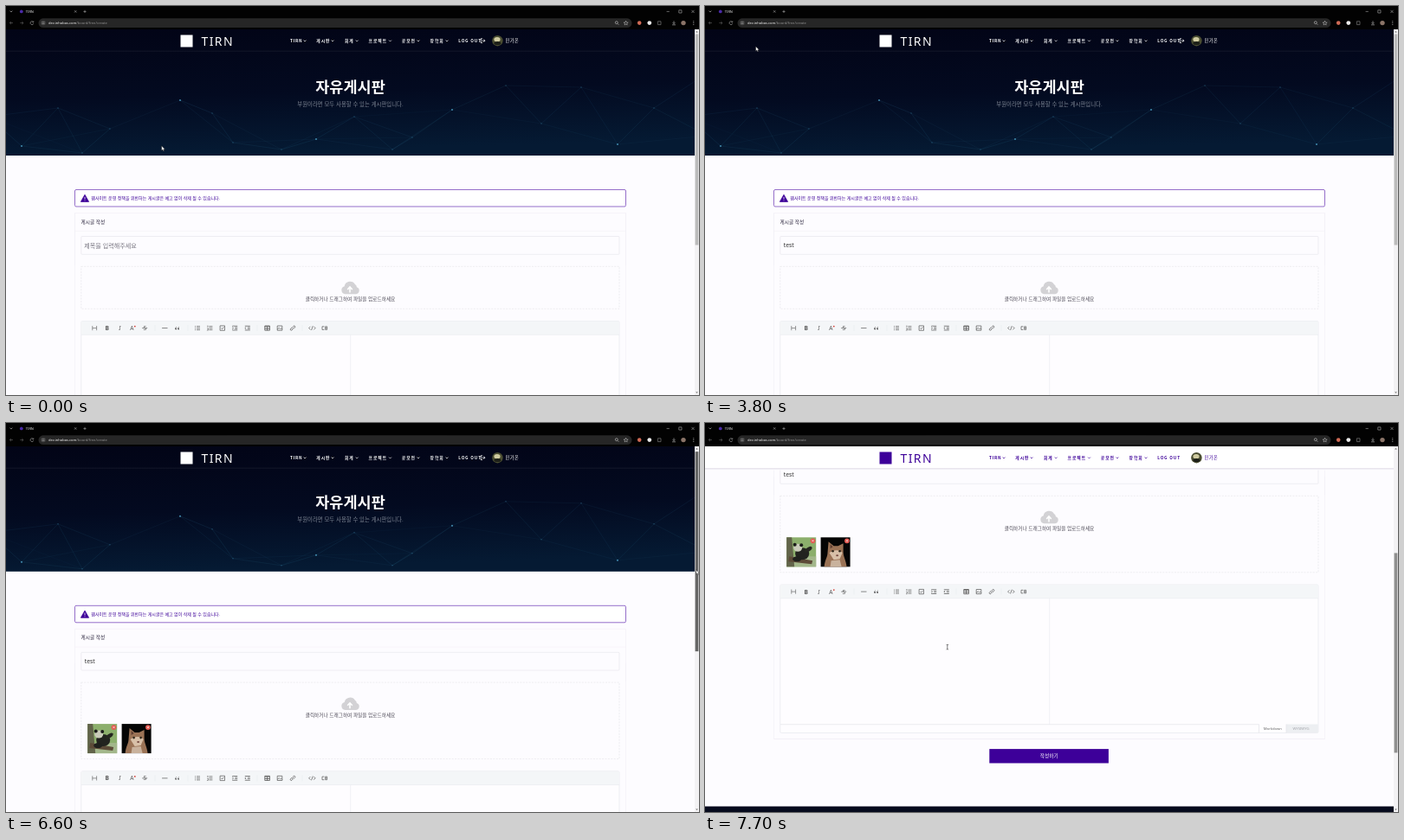
An HTML page that plays this animation: 800x450 px, repeating every 8 s.

```html
<!DOCTYPE html>
<html lang="ko">
<head>
<meta charset="utf-8">
<title>Board editor</title>
<style>
  html, body { margin: 0; width: 100%; height: 100%; overflow: hidden; background: #fdfcff; }
  svg { display: block; width: 800px; height: 450px; }
  text { font-family: "Noto Sans CJK KR", "Noto Sans CJK", "Noto Sans", sans-serif; white-space: pre; }
  .latin { font-family: "Noto Sans", "Open Sans", sans-serif; }
</style>
</head>
<body>
<svg id="stage" viewBox="0 0 800 450"></svg>
<script>
const LOOP = 8000, STEP = 100;
const SITE = 'TIRN', USER = '민가온';
const INK = '#3d0099', SHIFT = 39.5;

// Markup helpers
const rect = (x, y, w, h, fill, more = '') =>
  `<rect x="${x}" y="${y}" width="${w}" height="${h}" fill="${fill}" ${more}/>`;
const frame = (x, y, w, h, color, more = '') =>
  rect(x, y, w, h, 'none', `stroke="${color}" stroke-width=".6" ${more}`);
const ell = (x, y, rx, ry, fill, more = '') =>
  `<ellipse cx="${x}" cy="${y}" rx="${rx}" ry="${ry}" fill="${fill}" ${more}/>`;
const dot = (x, y, r, fill, more) => ell(x, y, r, r, fill, more);
const line = (d, color, w = .6, more = '') =>
  `<path d="${d}" fill="none" stroke="${color}" stroke-width="${w}" ${more}/>`;
const shape = (d, fill, more = '') => `<path d="${d}" fill="${fill}" ${more}/>`;
const text = (x, y, size, fill, str, more = '') =>
  `<text x="${x}" y="${y}" font-size="${size}" fill="${fill}" ${more}>${str}</text>`;
const group = (id, body, more = '') => `<g id="${id}" ${more}>${body}</g>`;
const MID = 'text-anchor="middle"', LATIN = 'class="latin"';

function hero() {
  const nodes = [[-20, 128], [18, 162], [88, 170], [60, 118], [120, 142], [201, 109], [238, 124],
    [262, 158], [318, 166], [358, 154], [402, 128], [446, 166], [469, 152], [515, 120], [577, 92],
    [618, 136], [664, 94], [706, 160], [748, 118], [800, 84], [810, 150]];
  let net = '';
  nodes.forEach(([x, y], i) => {
    nodes.slice(i + 1).forEach(([u, v]) => {
      const d = Math.hypot(u - x, v - y);
      if (d < 118) net += line(`M${x} ${y}L${u} ${v}`, '#2f7396', .45, `opacity="${(.46 - d / 330).toFixed(2)}"`);
    });
    net += dot(x, y, i % 4 === 1 ? 1.1 : .7, '#4b9cc0', `opacity="${i % 4 === 1 ? .8 : .4}"`);
  });
  return rect(0, 27, 795, 146, 'url(#night)') +
    `<g clip-path="url(#heroBox)">${net}</g>` +
    text(397.5, 99.5, 17.5, '#fff', '자유게시판', MID + ' font-weight="700"') +
    text(397.5, 115.6, 6.4, '#7d8492', '부원이라면 모두 사용할 수 있는 게시판입니다.', MID);
}

function formTop() {
  return rect(79.5, 212.5, 636, 19.5, '#fff', 'rx="1.5" stroke="#7a4bbd" stroke-width=".8"') +
    shape('M91 218.3L95.6 226.4H86.4Z', INK, `stroke="${INK}" stroke-width=".8" stroke-linejoin="round"`) +
    line('M91 220.8V223.6M91 224.6V225.4', '#fff', .8) +
    text(98.3, 224.2, 5, INK, '웹사이트 운영 정책을 위반하는 게시글은 예고 없이 삭제 될 수 있습니다.') +
    text(86.6, 251.6, 5.65, '#27223a', '게시글 작성', 'font-weight="500"') +
    line('M79.5 260.3H715.5', '#f1eff5') +
    frame(86.8, 266.5, 621.2, 20.8, '#e4e2e9', 'rx="1"') +
    text(90.3, 279.6, 7.05, '#77747f', '제목을 입력해주세요', 'id="hint"') +
    text(90.8, 279.4, 6.8, '#333', '', 'id="title" class="latin"') +
    rect(0, 273.2, .6, 7.6, '#222', 'id="caret"') +
    frame(86.8, 301.3, 621.2, 49, '#e3e1e6', 'id="drop" stroke-dasharray="2 1.4"') +
    shape('M391.5 333.2a4.6 4.6 0 0 1-.8-9a6.6 6.6 0 0 1 12.2-2.2a4 4 0 0 1 2 3.2a4.1 4.1 0 0 1-1.3 8Z', '#d3d2d5') +
    line('M397 331.4V325.4M394.2 328L397 325L399.8 328', '#fff', 1.6) +
    text(397.5, 341.3, 5.67, '#4c4955', '클릭하거나 드래그하여 파일을 업로드하세요', MID);
}

// Each thumbnail is drawn in a 34 x 34 box
const photos = [
  { name: 'panda.jpg', art: rect(0, 0, 34, 34, '#8caf6c') + rect(0, 22, 34, 12, '#a3b78b') +
    shape('M0 0H6L9 34H0Z', '#62644a') + shape('M3 22L30 27L29 31L2 28Z', '#5d4b38') +
    ell(18, 19, 8, 7, '#22231f') + ell(13, 12, 5, 4.5, '#c9cbb9') + dot(9.5, 8.5, 2, '#1b1c1a') +
    dot(17, 9, 2, '#1b1c1a') + ell(25, 14, 5, 2.3, '#252620', 'transform="rotate(-35 25 14)"') +
    ell(12, 25, 5, 3, '#20211e') },
  { name: 'cat.png', art: rect(0, 0, 34, 34, '#050505') +
    shape('M4 34C5 25 8 23 8 17L9 5L15 10H20L26 7L26 17C26 22 29 26 30 34Z', '#9b7356') +
    shape('M10 18C14 14 23 14 25 18L22 25L15 26Z', '#d8c0a8') + shape('M11 8L14 11L11 13Z', '#5e3d31') +
    shape('M12 27L22 26L24 34H11Z', '#c9b29d') + dot(14, 16, 1.3, '#2d261a') + dot(22, 16, 1.3, '#2d261a') +
    ell(19, 21, 1.5, 1, '#784c42') },
  { name: 'bear.jpg', art: rect(0, 0, 34, 34, '#26341f') + rect(22, 0, 12, 34, '#3f5130') +
    ell(16, 28, 12, 9, '#141613') + ell(16, 14, 9, 8.5, '#e3ddd0') + dot(8, 6, 3, '#111') +
    dot(24, 6, 3, '#111') + ell(12.5, 13, 2, 2.7, '#151515') + ell(20, 13, 2, 2.7, '#151515') +
    ell(16.3, 18, 1.7, 1.1, '#222') + ell(17, 27, 4, 3, '#d6d0c2') }
];
const thumbX = i => 94.2 + i * 39.4;

const thumbs = () => photos.map(({ name, art }, i) => group('photo' + i,
  art +
  `<g id="over${i}">${rect(0, 0, 34, 34, '#fff', 'opacity=".62"')}
   ${rect(8, 14.5, 18, 6, '#fff', 'opacity=".4" rx="1"')}
   ${text(17, 19, 4.4, '#333', name, MID + ' ' + LATIN)}</g>` +
  dot(30.3, 4, 2.9, '#e2574f') + line('M29.1 2.8L31.5 5.2M31.5 2.8L29.1 5.2', '#fff', .6),
  `transform="translate(${thumbX(i)} 349.3)"`)).join('');

function toolbar() {
  const c = '#555', y = 372.6;
  const icon = (x, d, w = .7) => line(d, c, w, `transform="translate(${x} ${y})"`);
  const glyph = (x, s, more = '') => text(x, y + 2.4, 6.6, c, s, `${MID} ${LATIN} ${more}`);
  const rows = 'M-1-2H3M-1 0H3M-1 2H3';
  const indent = 'M-3-2.4H3M0-.8H3M0 .8H3M-3 2.4H3';
  return line('M99.8 370V375.2M104.6 370V375.2M99.8 372.6H104.6', c) +
    glyph(116.8, 'B', 'font-weight="800"') + glyph(131.2, 'I', 'font-style="italic"') +
    glyph(145.4, 'A') + dot(148.8, 370.6, .9, '#d4453c') +
    glyph(160.2, 'S') + icon(160.2, 'M-3 0H3') +
    line('M172 369V376M210 369V376M290 369V376M342 369V376', '#e6e9ec', .5) +
    icon(183.3, 'M-3.2 0H3.2') +
    icon(198, 'M-1.2-1.4Q-2.6-.8-2.4 1M1.8-1.4Q.4-.8.6 1', .6) +
    dot(196.1, y + .9, .9, c) + dot(199.1, y + .9, .9, c) +
    icon(221, rows + 'M-3-2H-2M-3 0H-2M-3 2H-2') +
    icon(235.4, rows + 'M-2.5-3V-1M-3.1 .4H-2V1.6L-3 2.6H-1.9') +
    icon(249.8, 'M-2.7-2.7H2.7V2.7H-2.7ZM-1.4 0L-.3 1.1L1.6-1.2') +
    icon(264.2, indent + 'M-3-1.2L-1.6 0L-3 1.2') + icon(278.8, indent + 'M-1.6-1.2L-3 0L-1.6 1.2') +
    icon(301.6, 'M-2.8-2.6H2.8V2.6H-2.8ZM-2.8-1.8H2.8M-2.8 .6H2.8M0-1.8V2.6', .8) +
    icon(316, 'M-2.8-2.6H2.8V2.6H-2.8ZM-2.8 1.4L-.8-.2L.6 1L1.6 .2L2.8 1.4') +
    icon(331, 'M-.4-1L1-2.4Q2-3 2.6-2.2T2.4-.6L1 .8M.4 1L-1 2.4Q-2 3-2.6 2.2T-2.4 .6L-1-.8M-1 1L1-1') +
    icon(353.4, 'M-2-1.8L-3.8 0L-2 1.8M2-1.8L3.8 0L2 1.8M.8-2.4L-.8 2.4') +
    icon(367.8, 'M-.4-1.8H-2.8V1.8H-.4M.8-1.8V1.8H2.8V-1.8ZM.8 0H2.8');
}

function formBottom() {
  return rect(86.8, 364.5, 621.2, 171.5, '#fff', 'fill-opacity=".35" stroke="#e2e4e9" stroke-width=".6" rx="1.5"') +
    rect(87.1, 364.8, 620.6, 15.4, '#f4f6f8') + line('M87 380.3H708', '#e6e8ec') +
    toolbar() +
    line('M397.7 380.3V526', '#e9eaee') + line('M87 526.2H639.5V535.8', '#dedfe5') +
    rect(671, 526, 36.8, 9.8, '#edeff2') + line('M671 526V536', '#dfe1e6') +
    text(655.3, 532.6, 4.2, '#666', 'Markdown', MID + ' ' + LATIN) +
    text(688, 532.6, 4.2, '#a3a5ab', 'WYSIWYG', MID + ' ' + LATIN) +
    line('M79.5 239.5V543M715.5 239.5V543', '#f1eff5') + line('M79.5 543H715.5', '#eceaf0') +
    rect(328.3, 554.6, 137.6, 16.4, INK) +
    text(397.3, 564.9, 5.7, '#fff', '작성하기', MID + ' font-weight="500"') +
    rect(0, 621, 795, 140, '#060a1d');
}

function header(color, solid) {
  const menu = [[328, SITE, 345], [358.3, '게시판', 377], [391, '회계', 405.2], [418.6, '프로젝트', 443.5],
    [456.8, '공모전', 476], [489.6, '장학회', 509], [522.3, 'LOG OUT']];
  const items = menu.map(([x, label, arrow]) =>
    text(x, 42, 4.8, color, label, `font-weight="700" letter-spacing="${/[A-Z]/.test(label) ? .75 : .95}"`) +
    (arrow ? line(`M${arrow - 1.4} 39.6L${arrow} 41L${arrow + 1.4} 39.6`, color, .7) : '')).join('');
  const back = solid
    ? rect(0, 52, 795, 2.5, 'url(#shade)') + rect(0, 27, 795, 25.2, '#fff')
    : line('M0 52.2H795', '#fff', .5, 'opacity=".13"') +
      line('M550 37.8H548.2V42.6H550M549.6 40.2H553M551.6 38.8L553 40.2L551.6 41.6', color, .8);
  return back + rect(201.5, 33.5, 14, 14, color) +
    text(225.5, 45.8, 14, color, SITE, LATIN + ' letter-spacing="1.4"') + items +
    dot(567.4, 40.2, 6.2, '#4a4d31') + ell(567, 38.8, 3.6, 2.8, '#cfcba0') + ell(567.4, 43, 4, 2, '#1c1f18') +
    text(576.4, 42.1, 5.2, color, USER, 'letter-spacing=".5"');
}

function browser() {
  const c = '#c8c8c8', dim = '#6a6a6a';
  return rect(0, 0, 800, 27, '#020202') + rect(37.5, 14.3, 685, 10.8, '#262626', 'rx="5.4"') +
    line('M4.6 5.6L6 7L7.4 5.6', c) + dot(17.8, 6.4, 1.9, '#4a2aa8') +
    text(22.8, 7.9, 4, '#ddd', SITE, LATIN) +
    line('M79 5.2L81.4 7.6M81.4 5.2L79 7.6M89.4 6.4H92.6M91 4.8V8', c, .5) +
    line('M762.6 6.4H765.8M776.8 4.8H780V8H776.8ZM791.4 4.8L794.6 8M794.6 4.8L791.4 8', c, .5) +
    line('M8 19.6H4.4M6 18L4.4 19.6L6 21.2', dim) + line('M16.4 19.6H20M18.4 18L20 19.6L18.4 21.2', dim) +
    line('M31.4 18.4A1.9 1.9 0 1 0 31.8 20.2M31.8 17.4V18.8H30.4', c, .5) +
    dot(43, 19.6, 3, '#3a3a3a') + line('M41.4 18.8H44.6M41.4 20.6H44.6', c, .5) +
    text(49, 21.2, 4.1, '#f2f2f2', 'dev.inhabas.com<tspan fill="#8f8f8f">/board/free/create</tspan>', LATIN) +
    dot(704.8, 19.2, 1.5, 'none', `stroke="${c}" stroke-width=".6"`) + line('M706 20.4L707.4 21.8', c) +
    line('M715.6 17.2L716.3 19L718.2 19.1L716.7 20.2L717.2 22L715.6 21L714 22L714.5 20.2L713 19.1L714.9 19Z', c, .5) +
    dot(731.2, 19.6, 2.3, '#cf6a55') + dot(742.8, 19.6, 2.4, '#ececec') +
    line('M752.4 17.8H756V21.6H752.4Z', dim, .8) +
    line('M771 17.4V20.4M769.6 19.2L771 20.6L772.4 19.2M769 21.8H773', c) + dot(782, 19.6, 2.7, '#8b7468') +
    dot(793.8, 17.8, .5, c) + dot(793.8, 19.6, .5, c) + dot(793.8, 21.4, .5, c);
}

const stage = document.getElementById('stage');
stage.innerHTML = `<defs>
  <linearGradient id="night" x1="0" y1="0" x2=".15" y2="1">
    <stop offset="0" stop-color="#020416"/><stop offset=".55" stop-color="#030a20"/><stop offset="1" stop-color="#051a33"/>
  </linearGradient>
  <linearGradient id="shade" x1="0" y1="0" x2="0" y2="1">
    <stop offset="0" stop-color="#ddd9e4"/><stop offset="1" stop-color="#fdfcff"/>
  </linearGradient>
  <clipPath id="heroBox">${rect(0, 27, 795, 146, '#000')}</clipPath></defs>` +
  rect(0, 0, 800, 450, '#fdfcff') +
  group('page', hero() + line('M79.5 239.5H715.5', '#f1eff5') + group('lower', formBottom()) +
    line('M79.5 239.5V300M715.5 239.5V300', '#f1eff5') + formTop() + group('thumbs', thumbs())) +
  group('clear', header('#fff', false)) + group('solid', header(INK, true)) +
  rect(795, 27, 5, 423, '#f3f2f4') + shape('M796.2 30.6L797.5 29L798.8 30.6Z', '#666') +
  shape('M796.2 446.4L797.5 448L798.8 446.4Z', '#666') + rect(795.6, 32, 3.8, 244, '#bbb', 'id="bar"') +
  browser() +
  group('arrow', shape('M0 0V5.4L1.3 4.3L2.1 6.1L3 5.7L2.2 4H3.9Z', '#fff', 'stroke="#111" stroke-width=".45"')) +
  group('beam', line('M-1.2-2.8Q0-2.8 0-2.2Q0-2.8 1.2-2.8M0-2.2V2.2M-1.2 2.8Q0 2.8 0 2.2Q0 2.8 1.2 2.8', '#222', .6)) +
  group('hand', shape('M-.6 0Q0-.6.6 0V2L2.6 2.5Q3.2 2.7 3.1 3.4L2.6 6H-.6L-2.2 3.6Q-1.6 2.9-.6 3.8Z', '#fff', 'stroke="#111" stroke-width=".45"'));

const el = {};
stage.querySelectorAll('[id]').forEach(n => el[n.id] = n);

// time, x, y of the pointer tip
const moves = [[0, 179.6, 161.8], [900, 179.6, 161.8], [1700, 253, 280.3], [2400, 253, 280.3],
  [2900, 397, 327], [3100, 397, 327], [3700, 58.6, 46.8], [3900, 58.6, 46.8], [4700, 152, 366],
  [4900, 164, 356.8], [5100, 164, 356.8], [5400, 203.4, 353.5], [5600, 203.4, 353.5],
  [6400, 796.6, 169], [6600, 796.6, 169.6], [6800, 787.2, 266], [6900, 787.2, 283], [7000, 787.2, 283],
  [7400, 292, 256], [7600, 279.8, 259.2], [LOOP, 279.8, 259.2]];
const scrolls = [[0, 0], [6500, 0], [6600, 1.2], [6800, 186], [6900, 217], [LOOP, 217]];
const typed = [[0, ''], [2000, 't'], [2200, 'te'], [2300, 'tes'], [2400, 'test']];
const UPLOAD = 4200, REMOVE = 5500;

const smooth = p => p * p * (3 - 2 * p);
function at(keys, t, ease = p => p) {
  const i = Math.max(1, keys.findIndex(k => k[0] > t));
  const a = keys[i - 1], b = keys[i], p = ease((t - a[0]) / (b[0] - a[0]));
  return a.slice(1).map((v, j) => v + (b[j + 1] - v) * p);
}
const show = (node, on) => node.setAttribute('visibility', on ? 'inherit' : 'hidden');
const move = (node, x, y) => node.setAttribute('transform', `translate(${x.toFixed(2)} ${y.toFixed(2)})`);

function draw(t) {
  const [scroll] = at(scrolls, t), [x, y] = at(moves, t, smooth);
  const py = y + scroll, filled = t >= UPLOAD, shift = filled ? SHIFT : 0;

  move(el.page, 0, -scroll);
  move(el.lower, 0, shift);
  el.drop.setAttribute('height', 49 + shift);
  show(el.clear, scroll < 20);
  show(el.solid, scroll >= 20);

  const word = typed.filter(k => k[0] <= t).pop()[1];
  el.title.textContent = word;
  show(el.hint, !word);
  show(el.caret, t >= 1900 && t < 2800);
  el.caret.setAttribute('x', 91 + (word ? el.title.getComputedTextLength() : 0));

  show(el.thumbs, filled);
  photos.forEach((_, i) => {
    const dx = x - thumbX(i), dy = py - 349.3;
    show(el['photo' + i], i < 2 || t < REMOVE);
    show(el['over' + i], dx > 0 && dx < 34 && dy > 0 && dy < 34);
  });

  const drag = t >= 6500 && t < 7000;
  el.bar.setAttribute('y', 32.5 + scroll / 1.84);
  el.bar.setAttribute('height', filled ? 231 : 244);
  el.bar.setAttribute('fill', drag ? '#666' : t >= 7000 ? '#8f8f8f' : '#bbb');

  const inForm = x > 87 && x < 708, within = (a, b) => inForm && py > a && py < b;
  const kind = within(266, 287) || within(381 + shift, 526 + shift) ? 'beam'
    : within(301, 350 + shift) ? 'hand' : 'arrow';
  for (const k of ['arrow', 'beam', 'hand']) show(el[k], k === kind);
  move(el[kind], x, y);
}

function tick() {
  const t = performance.now() % LOOP;
  draw(Math.floor(t / STEP) * STEP);
  requestAnimationFrame(tick);
}
tick();
</script>
</body>
</html>
```
